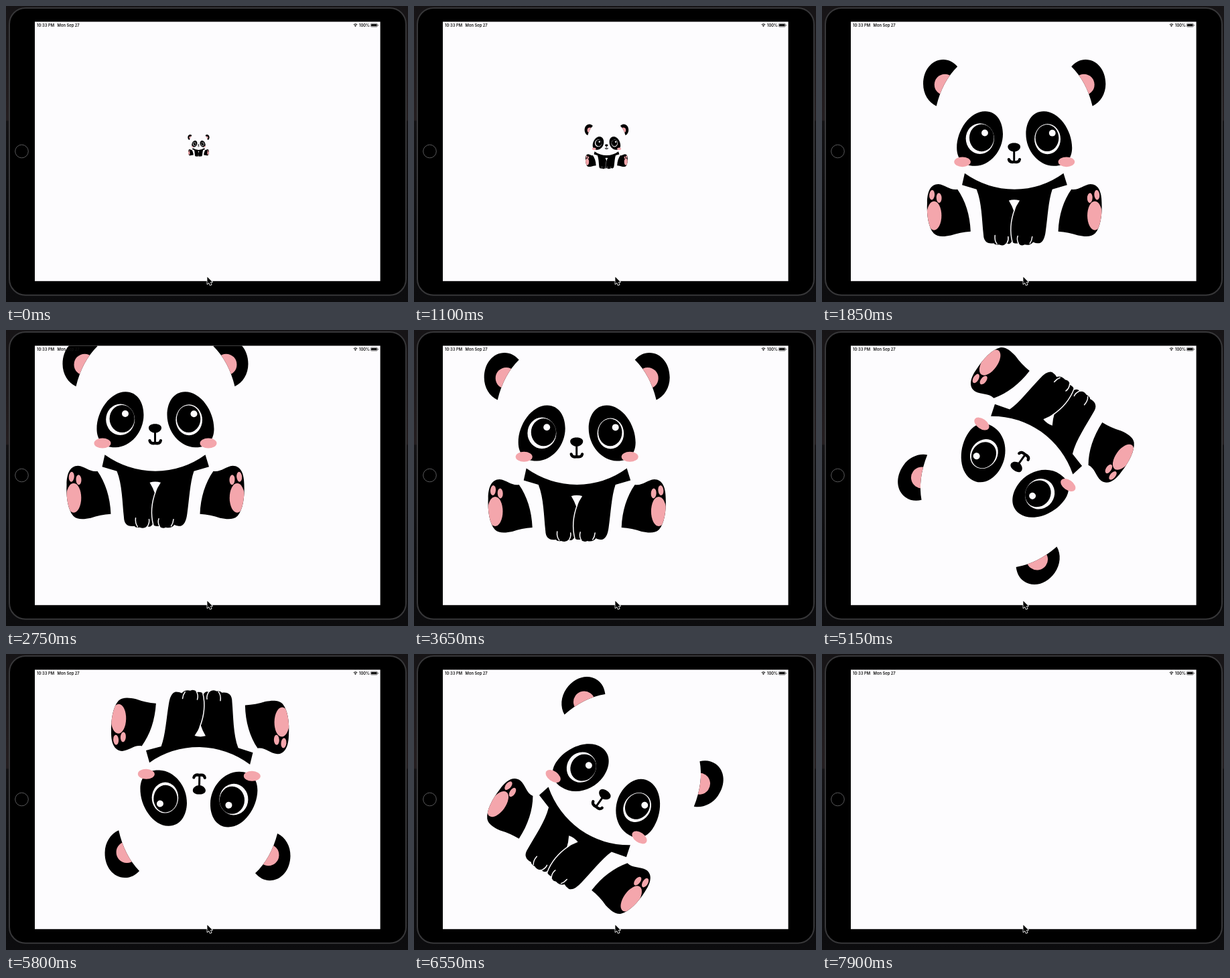
Write an HTML page with a canvas that moves like this. It is 600 by 442 pixels and loops after 8 s.

```html
<!DOCTYPE html>
<html lang="en">
<head>
<meta charset="utf-8">
<title>Panda springs</title>
<style>
html, body { margin: 0; width: 100%; height: 100%; overflow: hidden; background: #111; }
canvas { display: block; width: 600px; height: 442px; }
</style>
</head>
<body>
<canvas id="stage" width="600" height="442"></canvas>
<script>
const ctx = document.getElementById('stage').getContext('2d');
const LOOP = 8000, STEP = 50, LAST = 7900;
const PIVOT = { x: 287.5, y: 207 };
const SCREEN = [43, 23.5, 515.6, 387.3];
const BLACK = '#000', PAPER = '#fdfcfe', PINK = '#f4a6ac';

// Underdamped spring from 0 to 1, stiffness 100, mass 1; t in ms.
function spring(t, damping) {
  if (t <= 0) return 0;
  const s = t / 1000, decay = damping / 2, w = Math.sqrt(100 - decay * decay);
  return 1 - Math.exp(-decay * s) * (Math.cos(w * s) + decay / w * Math.sin(w * s));
}

function pose(t) {
  const shrinkEarly = 1 - spring(t + 201, 9.2);
  const grow = spring(t - 1020, 10);
  const shrinkLate = spring(t - 7669, 9.2);
  return {
    scale: t < 1020 ? shrinkEarly : grow - shrinkLate,
    shift: -62.2 * (spring(t - 2203, 9.5) - spring(t - 3560, 9.5)),
    turn: Math.PI * (spring(t - 4795, 9.2) + spring(t - 6200, 9.2))
  };
}

function fill(d, color) {
  ctx.fillStyle = color;
  ctx.fill(new Path2D(d));
}

function line(d, color, width) {
  ctx.strokeStyle = color;
  ctx.lineWidth = width;
  ctx.stroke(new Path2D(d));
}

function oval(x, y, rx, ry, color, tilt = 0) {
  ctx.fillStyle = color;
  ctx.beginPath();
  ctx.ellipse(x, y, rx, ry, tilt, 0, 2 * Math.PI);
  ctx.fill();
}

function clipped(d, draw) {
  ctx.save();
  ctx.clip(new Path2D(d));
  draw();
  ctx.restore();
}

const EAR = 'M168 147.5C156 142 148 129 148 114C148 93 161 77 178.5 77C187 77 194 81 200 87.5Q177 110 168 147.5Z';
const PATCH = 'M242 155.5C260 155.5 269 172 269 190C269 215 250 238 227 238.5C209 239 199 228 199 211C199 184 219 155.5 242 155.5Z';
const LEG = 'M200 274C189 276 182 267 171 266C159 266 154 278 154 294C153 313 156 332 164 341C170 347 180 346 190 344Q204 339 220 338C219 313 212 291 200 274Z';

function side() {
  fill(EAR, BLACK);
  clipped(EAR, () => oval(181, 115, 16, 16, PINK));
  fill(PATCH, BLACK);
  oval(207.5, 232.3, 12.5, 7.5, PINK);
  fill(LEG, BLACK);
  clipped(LEG, () => oval(164.5, 314, 11.3, 22, PINK));
  oval(161.3, 282.5, 4, 7.5, PINK, 0.08);
  oval(172, 287, 4, 7.5, PINK, -0.05);
}

function face() {
  oval(234.2, 197, 21.5, 23.3, PAPER);
  oval(236.7, 195.8, 18.6, 20.6, BLACK);
  oval(241.5, 188.3, 5, 5, PAPER);
  oval(336.7, 197.6, 19.8, 23, PAPER);
  oval(336.1, 196, 17.7, 20.3, BLACK);
  oval(344, 188.5, 5, 5, PAPER);
  fill('M286 203.5C292 203.5 296 206 295.5 210C295 214 290 217 286 217C282 217 277 214 276.5 210C276 206 280 203.5 286 203.5Z', BLACK);
  line('M286 215V231', BLACK, 3);
  line('M278 228.5Q279 233.6 286.2 232.3Q293.5 233.6 294.4 228.5', BLACK, 4.3);
}

function body() {
  fill('M211 249.5Q245 273.5 286.5 274Q328 273.5 361 249.5L366.5 267.5L344 274' +
    'C338 291 337 317 334 337Q332 354 324 356Q318 356 315 354Q310 360 302 358' +
    'Q297 361 292 356Q285 357 282.5 353Q279 359 274 356Q270 361 263 358' +
    'Q257 359 255 356Q240 358 239.5 343C237 320 237 294 229 274L207 267.5Z', BLACK);
  fill('M278 291Q286 288.5 294.5 291Q289 299 286 308Q283 299 278 291Z', PAPER);
  line('M287 304C281 320 279 338 283.5 355', PAPER, 1.5);
  line('M257 344Q256 352 260 357M277 346Q278 351 275 356M291.5 345Q289.5 351 293 357M313.5 346Q313 352 310 356', PAPER, 1.5);
}

function panda(p) {
  if (Math.abs(p.scale) < 0.003) return;
  ctx.save();
  ctx.beginPath();
  ctx.rect(...SCREEN);
  ctx.clip();
  ctx.translate(PIVOT.x + p.shift, PIVOT.y + p.shift);
  ctx.rotate(p.turn);
  ctx.scale(p.scale, p.scale);
  ctx.translate(0.7 - PIVOT.x, 0.9 - PIVOT.y);
  ctx.lineCap = 'round';
  side();
  ctx.save();
  ctx.translate(573, 0);
  ctx.scale(-1, 1);
  side();
  ctx.restore();
  face();
  body();
  ctx.restore();
}

function tablet() {
  const back = ctx.createLinearGradient(0, 0, 0, 442);
  back.addColorStop(0, '#161416');
  back.addColorStop(0.385, '#241e20');
  back.addColorStop(0.39, '#131214');
  back.addColorStop(0.75, '#0b0b0d');
  back.addColorStop(1, '#0d0d0f');
  ctx.fillStyle = back;
  ctx.fillRect(0, 0, 600, 442);
  ctx.beginPath();
  ctx.roundRect(5, 3, 592, 428.8, 24);
  ctx.fillStyle = BLACK;
  ctx.fill();
  ctx.strokeStyle = '#373739';
  ctx.lineWidth = 2;
  ctx.stroke();
  ctx.beginPath();
  ctx.arc(23.5, 217, 9.8, 0, 2 * Math.PI);
  ctx.strokeStyle = '#58585a';
  ctx.lineWidth = 1;
  ctx.stroke();
  ctx.fillStyle = PAPER;
  ctx.fillRect(...SCREEN);
}

function statusBar() {
  ctx.fillStyle = '#111';
  ctx.font = '600 5.8px Inter, sans-serif';
  ctx.fillText('10:33 PM', 46, 30.6);
  ctx.fillText('Mon Sep 27', 76.6, 30.6);
  ctx.fillText('100%', 527, 30.6);
  ctx.lineWidth = 1.1;
  ctx.strokeStyle = '#111';
  for (const r of [1.8, 3.5]) {
    ctx.beginPath();
    ctx.arc(521.5, 30.5, r, -2.4, -0.74);
    ctx.stroke();
  }
  oval(521.5, 30.3, 0.8, 0.8, '#111');
  ctx.lineWidth = 0.5;
  ctx.beginPath();
  ctx.roundRect(544.2, 26.2, 10.2, 4.9, 1.3);
  ctx.stroke();
  ctx.beginPath();
  ctx.roundRect(545, 27, 8.6, 3.3, 0.7);
  ctx.fill();
  ctx.fillRect(555, 27.9, 0.6, 1.6);
}

function cursor() {
  const d = 'M300.4 404.5V415.2L302.9 412.9L304.6 416.8L306.6 416L304.9 412.2H308.1Z';
  ctx.lineJoin = 'round';
  line(d, '#fff', 1.6);
  fill(d, BLACK);
}

function draw(now) {
  const t = Math.min(Math.floor(now % LOOP / STEP) * STEP, LAST);
  tablet();
  panda(pose(t));
  statusBar();
  cursor();
}

const start = performance.now();
function tick() {
  draw(performance.now() - start);
  requestAnimationFrame(tick);
}
tick();
</script>
</body>
</html>
```
